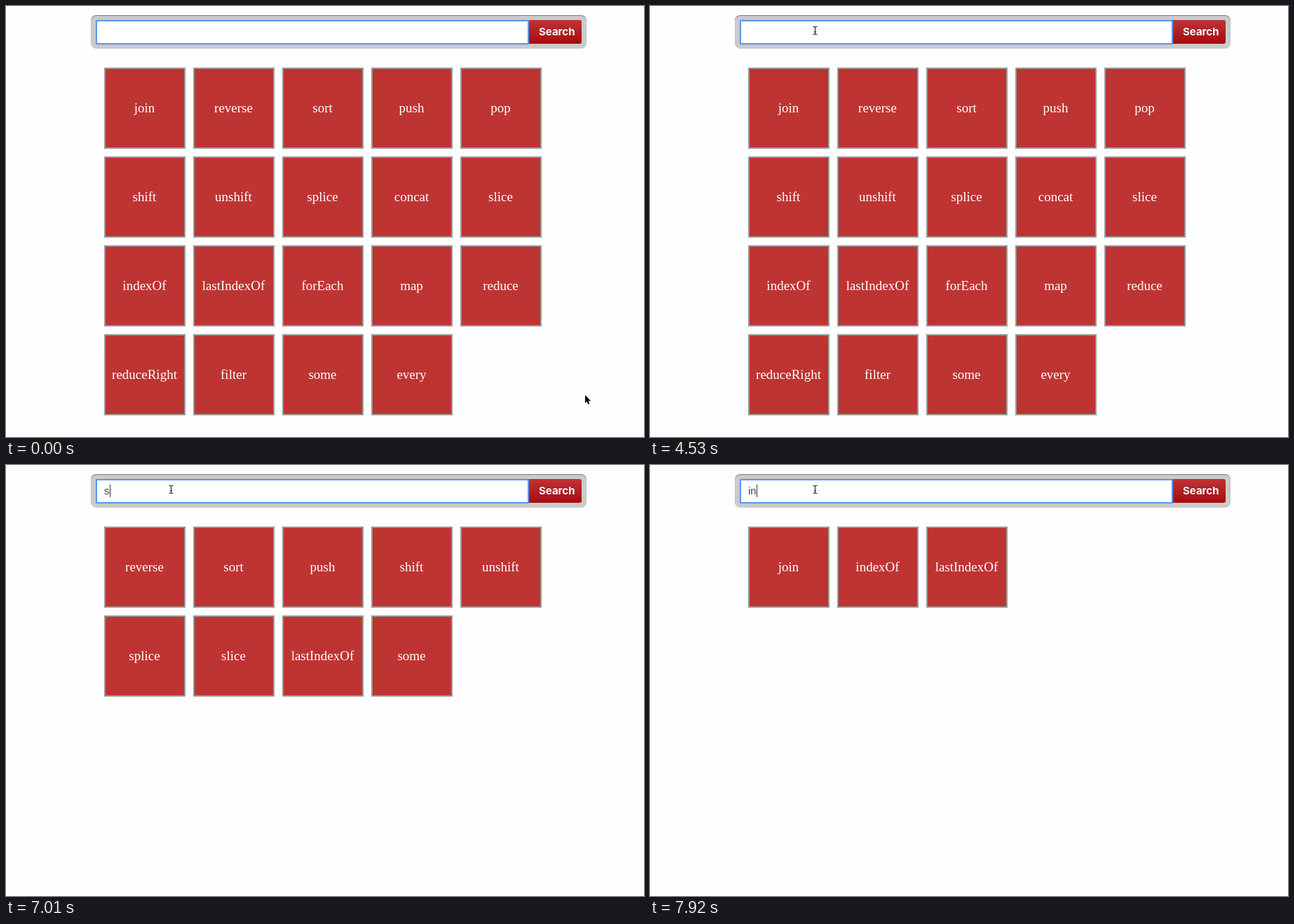
An HTML page that plays this animation: 910x616 px, repeating every 8 s.

```html
<!DOCTYPE html>
<html lang="en">
<head>
<meta charset="utf-8">
<title>Array method search</title>
<style>
  html, body { margin: 0; width: 100%; height: 100%; overflow: hidden; background: #fefefe; }
  svg { display: block; }
  .bar, .field, .button { position: absolute; box-sizing: border-box; }
  .bar {
    left: 121px; top: 13px; width: 707px; height: 48px; border-radius: 8px;
    background: #cbcbcb; box-shadow: inset 0 1px 1px rgba(0, 0, 0, .4);
  }
  .button {
    left: 744px; top: 20px; width: 77px; height: 34px; border-radius: 0 3px 3px 0;
    background: linear-gradient(#c03335, #a60b0f);
    color: #fff; font: 700 15px/34px Inter, "Open Sans", sans-serif;
    padding-left: 16px; text-shadow: 0 -1px 0 rgba(0, 0, 0, .25);
  }
  .field {
    left: 128px; top: 20px; width: 618px; height: 35px;
    background: #fff; border: 2px solid #5b97ee; border-radius: 2px;
    box-shadow: 0 0 1px #5b97ee;
  }
  svg { position: absolute; left: 0; top: 0; }
  .tile rect { fill: #be3433; stroke: #999; stroke-width: 2; }
  .tile text { fill: #fff; font: 19px "Liberation Serif", Times, serif; text-anchor: middle; }
  #query { fill: #444; font: 15px "Liberation Sans", Arial, sans-serif; }
</style>
</head>
<body>
<div class="bar"></div>
<div class="button">Search</div>
<div class="field"></div>
<svg width="910" height="616" viewBox="0 0 910 616">
  <g id="tiles"></g>
  <text id="query" x="140" y="42"></text>
  <rect id="caret" y="28" width="1" height="18" fill="#333"/>
  <path id="arrow" d="M0 0V11.6L2.6 9.2 4.3 13.2 6.3 12.4 4.6 8.4H8.2Z" fill="#000" stroke="#fff" stroke-width="1.6" paint-order="stroke" stroke-linejoin="round"/>
  <path id="beam" d="M-3 -5.5H-1.2L0 -4.5 1.2 -5.5H3M0 -4.5V4.5M-3 5.5H-1.2L0 4.5 1.2 5.5H3M-1.5 2H1.5" fill="none" stroke="#222" stroke-width="1.1"/>
</svg>
<script>
const LOOP = 8000;
const METHODS = ("join reverse sort push pop shift unshift splice concat slice indexOf lastIndexOf " +
  "forEach map reduce reduceRight filter some every").split(" ");

// [time, typed text, caret visible]
const TYPING = [
  [0, "", 0], [80, "", 1], [560, "", 0], [1020, "", 1], [1540, "", 0], [2080, "", 1],
  [2530, "", 0], [3070, "", 1], [3520, "", 0], [4050, "", 1], [4530, "", 0],
  [4710, "s", 1], [4890, "so", 1], [5460, "sor", 1], [5940, "sor", 0], [6030, "sort", 1],
  [6390, "sor", 1], [6480, "so", 1], [6570, "so", 0], [6830, "s", 0], [7010, "s", 1],
  [7090, "", 1], [7450, "", 0], [7750, "i", 1], [7920, "in", 1]
];

const smooth = p => p * p * (3 - 2 * p);
const easeOut = p => 1 - (1 - p) ** 2.42;
const START = [826, 556];
// Pointer strokes, each sampled in even steps
const STROKES = [
  { at: 290, end: 1020, steps: 9, to: [532, 287], ease: smooth },
  { at: 1110, end: 1720, steps: 8, to: [532, 218], ease: smooth },
  { at: 1990, end: 1990, steps: 1, to: [527, 213], ease: smooth },
  { at: 2350, end: 2800, steps: 6, to: [235.5, 35], ease: easeOut }
];

const byId = id => document.getElementById(id);
const tiles = byId("tiles"), query = byId("query"), caret = byId("caret");
const arrow = byId("arrow"), beam = byId("beam");

function add(parent, tag, attrs) {
  const el = document.createElementNS("http://www.w3.org/2000/svg", tag);
  for (const key in attrs) el.setAttribute(key, attrs[key]);
  return parent.appendChild(el);
}

const cells = METHODS.map(name => {
  const g = add(tiles, "g", { class: "tile" });
  add(g, "rect", { x: 1, y: 1, width: 114, height: 114 });
  add(g, "text", { x: 57.5, y: 64 }).textContent = name;
  return { name: name.toLowerCase(), g };
});

function show(el, on) {
  el.style.display = on ? "" : "none";
}

function filterTiles(text) {
  let slot = 0;
  for (const { name, g } of cells) {
    const match = name.includes(text);
    show(g, match);
    if (!match) continue;
    g.setAttribute("transform", `translate(${140 + slot % 5 * 127} ${88 + Math.floor(slot / 5) * 127})`);
    slot++;
  }
}

function pointerAt(t) {
  let pos = START;
  for (const { at, end, steps, to, ease } of STROKES) {
    if (t < at) break;
    const gap = (end - at) / (steps - 1) || 1;
    const p = ease(Math.min(1, (Math.floor((t - at) / gap + 0.02) + 1) / steps));
    pos = pos.map((v, i) => v + (to[i] - v) * p);
  }
  return pos;
}

let shown = null;
function draw(t) {
  const [, text, caretOn] = TYPING.findLast(row => row[0] <= t);
  if (text !== shown) {
    shown = text;
    query.textContent = text;
    filterTiles(text);
    caret.setAttribute("x", 140 + Math.round(text ? query.getComputedTextLength() : 0));
  }
  show(caret, caretOn);

  const [x, y] = pointerAt(t);
  const inField = x > 128 && x < 745 && y > 20 && y < 54;
  show(arrow, !inField);
  show(beam, inField);
  (inField ? beam : arrow).setAttribute("transform", `translate(${x} ${y})`);
}

const begin = performance.now();
function tick() {
  draw((performance.now() - begin) % LOOP);
  requestAnimationFrame(tick);
}
tick();
</script>
</body>
</html>
```
